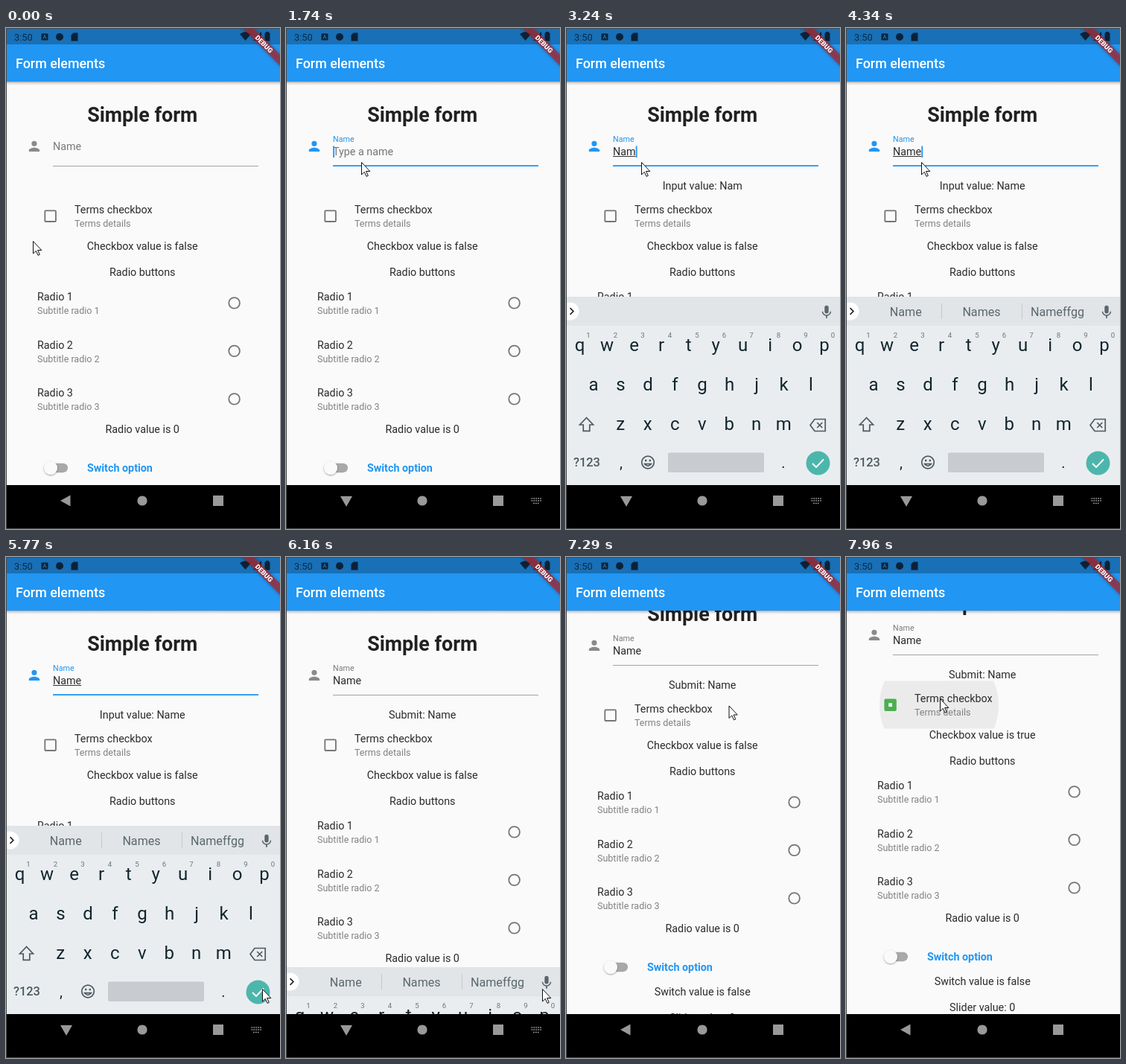
Animation of 368 by 673 pixels, one loop 8 s. Source, as an HTML page:

```html
<!DOCTYPE html>
<html lang="en">
<head>
<meta charset="utf-8">
<title>Form elements</title>
<style>
html, body { margin: 0; width: 100%; height: 100%; overflow: hidden; background: #000; }
svg { display: block; width: 100%; height: 100%; }
text { font-family: Roboto, sans-serif; font-size: 14.32px; fill: #2b2b2b; white-space: pre; }
.mid { text-anchor: middle; }
.sub { font-size: 12.52px; fill: #828282; }
.key { font-size: 24px; fill: #11262d; text-anchor: middle; }
.num { font-size: 9.6px; fill: #6a7579; text-anchor: middle; }
.word { font-size: 16.1px; fill: #5a676c; text-anchor: middle; }
.line { fill: none; stroke: #4d5a5f; stroke-width: 1.7; }
</style>
</head>
<body>
<svg viewBox="0 0 368 673" preserveAspectRatio="none">
  <defs>
    <clipPath id="page"><rect x="1" y="72" width="367" height="542"/></clipPath>
    <clipPath id="tile"><rect x="1" y="220.5" width="367" height="64"/></clipPath>
    <linearGradient id="fade" x2="0" y2="1">
      <stop stop-opacity=".32"/><stop offset=".4" stop-opacity=".12"/><stop offset="1" stop-opacity="0"/>
    </linearGradient>
    <filter id="soft" x="-50%" y="-50%" width="200%" height="200%">
      <feDropShadow dx="0" dy="1" stdDeviation="1" flood-opacity=".4"/>
    </filter>
    <filter id="glow" x="-20%" y="-80%" width="140%" height="260%">
      <feDropShadow dx="0" dy="0" stdDeviation="2" flood-opacity=".5"/>
    </filter>
  </defs>
  <rect width="368" height="673" fill="#fafafa"/>

  <g clip-path="url(#page)">
    <g id="content">
      <text class="mid" x="183.2" y="126" style="font-size:26.85px;font-weight:700;fill:#212121">Simple form</text>
      <path id="person" transform="translate(27.2 148.2) scale(.895)" d="M12 12a4 4 0 1 0 0-8a4 4 0 0 0 0 8zm0 2c-2.67 0-8 1.34-8 4v2h16v-2c0-2.66-5.33-4-8-4z"/>
      <text id="label" x="63">Name</text>
      <text id="hint" x="63" y="171" style="fill:#757575">Type a name</text>
      <text id="value" x="63" y="171"></text>
      <rect id="composing" x="63" y="172" height="1" fill="#333"/>
      <rect id="caret" y="158.5" width="1.8" height="15.5" fill="#2196f3"/>
      <rect id="underline" x="63" width="276"/>
      <text id="message" class="mid" x="183.2" y="217"></text>

      <circle id="ripple" cx="125" cy="253" fill="#ebebeb" clip-path="url(#tile)"/>
      <rect id="box" x="52.3" y="245.4" width="14.6" height="14.6" rx="1"/>
      <rect id="boxHole" x="57.2" y="250.3" width="4.8" height="4.8" fill="#fff"/>
      <text x="92" y="249">Terms checkbox</text>
      <text class="sub" x="92" y="267">Terms details</text>
      <text id="checkText" class="mid" x="183.2" y="298.3"></text>
      <text class="mid" x="183.2" y="333.3">Radio buttons</text>
      <g id="radios"></g>
      <text class="mid" x="183.2" y="544.3">Radio value is 0</text>
      <rect x="53.5" y="584.7" width="29.5" height="12.5" rx="6.25" fill="#a8a8a8"/>
      <circle cx="60" cy="591" r="9" fill="#fafafa" filter="url(#soft)"/>
      <text x="109" y="595.8" style="font-weight:700;fill:#2196f3">Switch option</text>
      <text class="mid" x="183.2" y="629.3">Switch value is false</text>
      <text class="mid" x="183.2" y="664.3">Slider value: 0</text>
    </g>
    <rect y="72" width="368" height="5" fill="url(#fade)"/>

    <g id="keyboard">
      <rect y="361" width="368" height="260" fill="#eaedf0"/>
      <rect y="361" width="368" height="39" fill="#e1e5e8"/>
      <circle cx="5.5" cy="380.5" r="12" fill="#fff"/>
      <path class="line" style="stroke:#222" d="M5.5 376.2l4.3 4.3l-4.3 4.3"/>
      <text id="tip" class="mid" x="182" y="385.8" style="fill:#45b5a4">Suggest contacts? Tap for info.</text>
      <g id="words">
        <path d="M128.5 370v21M236.5 370v21" stroke="#c3c9cc"/>
        <text class="word" x="80.3" y="386.5">Name</text>
        <text class="word" x="182" y="386.5">Names</text>
        <text class="word" x="284" y="386.5">Nameffgg</text>
      </g>
      <path transform="translate(339.3 371) scale(.89)" fill="#5a666b" d="M12 14a3 3 0 0 0 3-3V5a3 3 0 0 0-6 0v6a3 3 0 0 0 3 3zm5.3-3c0 3-2.54 5.1-5.3 5.1S6.7 14 6.7 11H5c0 3.41 2.72 6.23 6 6.72V21h2v-3.28c3.28-.48 6-3.3 6-6.72z"/>
      <g id="keys"></g>
      <path class="line" d="M27.5 523.5l-9 9.5h4.7v8.3h8.6v-8.3h4.7z"/>
      <path class="line" d="M334 525.5h14.2v16H334l-6-8zm3.2 4.5l7 7m0-7l-7 7"/>
      <text x="10" y="589.3" style="font-size:16.4px;font-weight:500;fill:#4d5a5f">?123</text>
      <text class="key" style="font-size:20px" x="74" y="590.5">,</text>
      <text class="key" style="font-size:20px" x="292" y="590.5">.</text>
      <circle class="line" cx="110" cy="583.5" r="8.3"/>
      <path class="line" d="M105.7 585.7q4.3 5.2 8.6 0z" fill="#4d5a5f"/>
      <path d="M106 581h2.4m3.2 0h2.4" stroke="#4d5a5f" stroke-width="2.4"/>
      <rect x="137" y="570.5" width="129" height="26.5" rx="2" fill="#c8ccd0"/>
      <circle cx="338.5" cy="584.5" r="16" fill="#4db6ac"/>
      <path d="M331 585l5 5l10-10.5" fill="none" stroke="#fff" stroke-width="1.9"/>
    </g>
  </g>

  <rect y="22" width="368" height="50" fill="#2196f3"/>
  <rect width="368" height="22" fill="#1970b6"/>
  <text x="13" y="54" style="font-size:17.9px;font-weight:500;fill:#fff">Form elements</text>
  <g fill="#0b2237">
    <text x="11" y="16.5" style="font-size:12.8px;fill:#0b2a45">3:50</text>
    <rect x="47.5" y="7.5" width="9" height="9" rx="1"/>
    <path d="M49.8 14.6l2.2-5.4l2.2 5.4m-3.6-1.8h2.8" fill="none" stroke="#1970b6"/>
    <circle cx="72" cy="12" r="5"/>
    <path d="M90.5 6.5h6v11h-9v-8z"/>
    <path d="M314 8q7.5-5.5 15 0l-7.5 9z"/>
    <path d="M343 5v12h-11z"/>
    <path d="M349 5h4v1.5h1.5v11h-7v-11h1.5z"/>
  </g>
  <g transform="translate(368 0) rotate(45)">
    <rect x="-45" y="25" width="90" height="10.8" fill="#b71c1c" fill-opacity=".63" filter="url(#glow)"/>
    <text class="mid" y="33.6" style="font-size:9.1px;font-weight:900;fill:#fff">DEBUG</text>
  </g>

  <rect y="614" width="368" height="59" fill="#000"/>
  <g fill="#999">
    <path id="back"/>
    <circle cx="183" cy="635" r="6.6"/>
    <rect x="278" y="628" width="14" height="14"/>
    <path id="imeIcon" d="M329.5 632h13.5M329.5 635h13.5M332 638.5h8.5" stroke="#999" stroke-width="1.7" stroke-dasharray="1.8 1.1"/>
  </g>
  <path d="M.5 673V.5H368M0 672.5H368" fill="none" stroke="#484848"/>
  <path id="mouse" d="M0 0V16.5l3.8-3.6l2.7 6l2.3-1l-2.7-5.9h5.2z" fill="#fff" stroke="#111"/>
</svg>
<script>
const LOOP = 8000, BLUE = '#2196f3';
const $ = id => document.getElementById(id);
const set = (id, attrs) => {
  for (const name in attrs) $(id).setAttribute(name, attrs[name]);
};
const show = (id, on) => set(id, { visibility: on ? 'visible' : 'hidden' });
const write = (id, text) => { if ($(id).textContent !== text) $(id).textContent = text; };

$('radios').innerHTML = [1, 2, 3].map(n => {
  const y = (n - 1) * 64.5;
  return `<text x="42" y="${366 + y}">Radio ${n}</text>
    <text class="sub" x="42" y="${384 + y}">Subtitle radio ${n}</text>
    <circle cx="306.6" cy="${369.4 + y}" r="7.3" fill="none" stroke="#757575" stroke-width="1.8"/>`;
}).join('');

const keyRow = (letters, x, y) => [...letters].map((letter, i) =>
  `<text class="key" x="${x + i * 36.5}" y="${y}">${letter}</text>`).join('');
$('keys').innerHTML = keyRow('qwertyuiop', 18.6, 433.6) + keyRow('asdfghjkl', 37, 486.5) +
  keyRow('zxcvbnm', 73.2, 539.5) + [...'1234567890'].map((digit, i) =>
  `<text class="num" x="${30 + i * 36.5}" y="416">${digit}</text>`).join('');

// Each step holds only what changes at that time; sheet is the keyboard's distance below rest.
const steps = [
  [0, { mouse: [36.5, 286.5], float: 0, focus: false, hint: false, value: '', composing: false,
        caret: false, message: '', sheet: 260, ime: false, words: 0, scroll: 0, ripple: 0, checked: false }],
  [430, { mouse: [46, 271] }],
  [570, { mouse: [72, 228] }],
  [710, { mouse: [96, 189] }],
  [860, { mouse: [101.5, 180.5] }],
  [1490, { focus: true, float: .5 }],
  [1740, { float: 1, hint: true, caret: true, ime: true }],
  [2000, { sheet: 60 }],
  [2120, { sheet: 0, caret: false }],
  [2440, { caret: true }],
  [3090, { hint: false, value: 'N', composing: true, message: 'Input value: N' }],
  [3220, { value: 'Nam', message: 'Input value: Nam', words: 1 }],
  [3360, { value: 'Name', message: 'Input value: Name', words: 2 }],
  [3940, { caret: false }],
  [4340, { caret: true }],
  [4620, { mouse: [92, 208] }],
  [4770, { mouse: [72, 250] }],
  [4920, { mouse: [66.5, 261], caret: false }],
  [5350, { mouse: [105, 300], caret: true }],
  [5490, { mouse: [215, 420] }],
  [5630, { mouse: [318, 548] }],
  [5770, { mouse: [344.5, 580.5], caret: false }],
  [5890, { focus: false, composing: false, message: 'Submit: Name' }],
  [6010, { sheet: 70 }],
  [6150, { sheet: 190 }],
  [6310, { sheet: 260, ime: false }],
  [6440, { mouse: [335, 545] }],
  [6580, { mouse: [300, 450] }],
  [6720, { mouse: [252, 342] }],
  [6880, { mouse: [226, 274] }],
  [7040, { mouse: [219.5, 253.5] }],
  [7160, { mouse: [219, 226], scroll: 14 }],
  [7290, { mouse: [219, 200], scroll: 40 }],
  [7410, { mouse: [219, 186.5], scroll: 54 }],
  [7560, { mouse: [165, 188] }],
  [7760, { mouse: [126.5, 190.5], ripple: 25 }],
  [7960, { ripple: 80, checked: true }]
];

function draw(s) {
  set('mouse', { transform: `translate(${s.mouse})` });
  set('content', { transform: `translate(0 ${-s.scroll})` });
  set('person', { fill: s.focus ? BLUE : '#8a8a8a' });
  set('label', { y: 164 - 11 * s.float });
  $('label').style.fontSize = 14.32 - 3.58 * s.float + 'px';
  $('label').style.fill = s.focus ? BLUE : '#7b7b7b';
  show('hint', s.hint);
  write('value', s.value);
  const width = s.value ? $('value').getComputedTextLength() : 0;
  set('composing', { width: s.composing ? width : 0 });
  set('caret', { x: 63.2 + width });
  show('caret', s.caret);
  set('underline', s.focus ? { y: 184.2, height: 1.8, fill: BLUE } : { y: 185, height: 1, fill: '#a3a3a3' });
  write('message', s.message);

  set('ripple', { r: s.ripple });
  set('box', { fill: s.checked ? '#4caf50' : 'none', stroke: s.checked ? '#4caf50' : '#757575', 'stroke-width': 1.8 });
  show('boxHole', s.checked);
  write('checkText', `Checkbox value is ${s.checked}`);

  set('keyboard', { transform: `translate(0 ${s.sheet})` });
  show('tip', s.words === 0);
  show('words', s.words === 2);
  show('imeIcon', s.ime);
  set('back', { d: s.ime ? 'M73 629h16l-8 14z' : 'M73 635l13.5-7.5v15z' });
}

const start = performance.now();
let shown = -1;
function tick() {
  const time = (performance.now() - start) % LOOP;
  const count = steps.filter(([at]) => at <= time).length;
  if (count !== shown) {
    shown = count;
    draw(Object.assign({}, ...steps.slice(0, count).map(step => step[1])));
  }
  requestAnimationFrame(tick);
}
tick();
</script>
</body>
</html>
```
